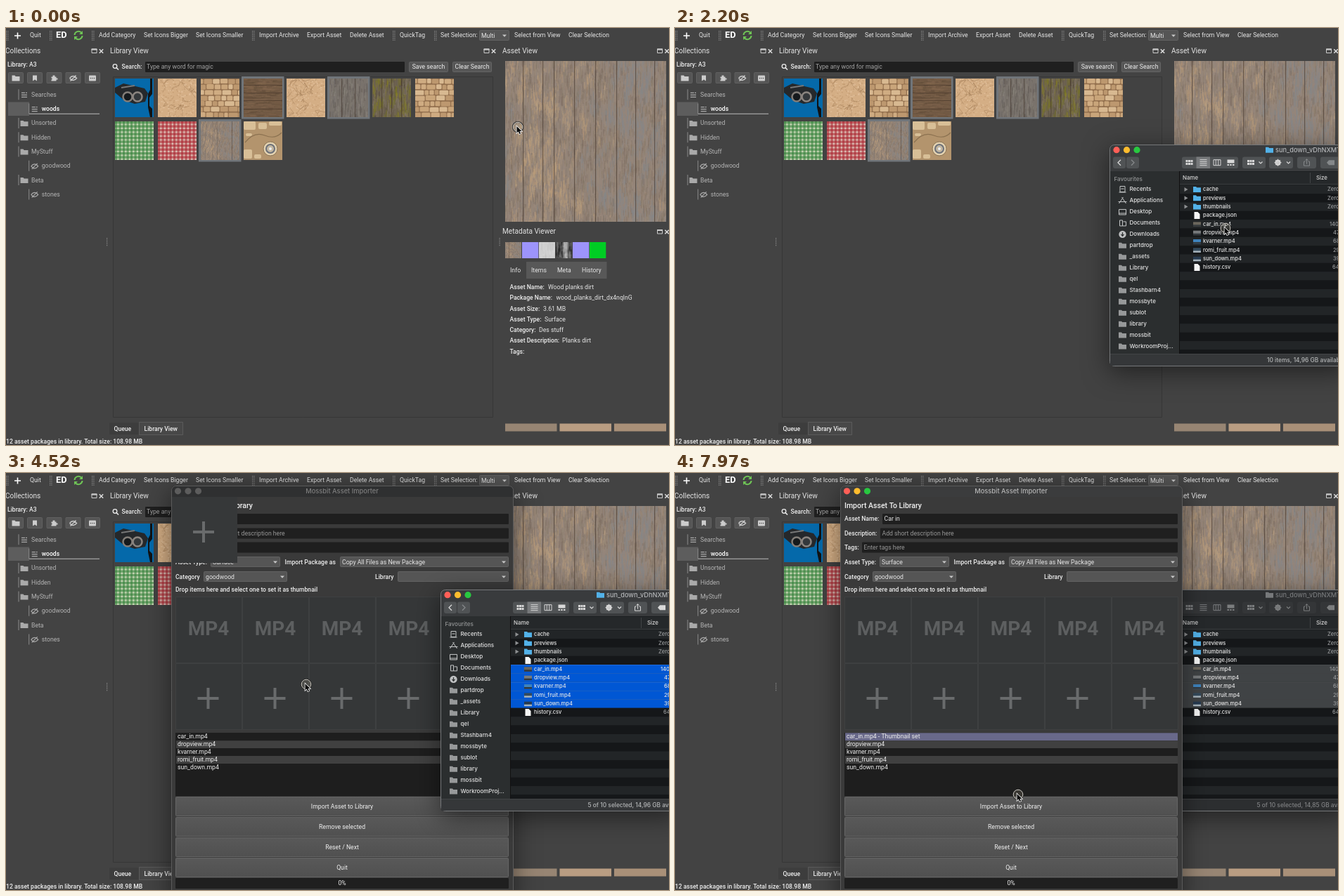
An HTML page with a canvas for the animation above (8 s loop, 943 by 594 pixels).

```html
<!DOCTYPE html>
<html lang="en">
<head>
<meta charset="utf-8">
<title>Asset library</title>
<style>
  html, body { margin: 0; height: 100%; overflow: hidden; background: #434343; }
  canvas { display: block; }
</style>
</head>
<body>
<canvas width="943" height="594"></canvas>
<script>
const LOOP = 8000, W = 943, H = 594;
let g = document.querySelector('canvas').getContext('2d');

let seed = 11;
const rnd = (a = 0, b = 1) => a + (b - a) * ((seed = seed * 16807 % 2147483647) / 2147483647);
const pick = list => list[Math.floor(rnd(0, list.length))];

const app = (size = 8.7, weight = 400) => `${weight} ${size}px Roboto, sans-serif`;
const sys = (size = 8, weight = 500) => `${weight} ${size}px Inter, sans-serif`;
const BOLD = app(8.6, 500), HEAD = app(10.1);

function rect(x, y, w, h, color, r = 0, line) {
  g.beginPath();
  g.roundRect(x, y, w, h, r);
  if (color) { g.fillStyle = color; g.fill(); }
  if (line) { g.strokeStyle = line; g.lineWidth = 1; g.stroke(); }
}
function disc(x, y, r, color, line, width = 1) {
  g.beginPath();
  g.arc(x, y, r, 0, 7);
  if (color) { g.fillStyle = color; g.fill(); }
  if (line) { g.strokeStyle = line; g.lineWidth = width; g.stroke(); }
}
function text(s, x, y, color = '#e6e6e6', font = app(), align = 'left') {
  g.font = font;
  g.fillStyle = color;
  g.textAlign = align;
  g.textBaseline = 'middle';
  g.fillText(s, x, y);
}
// Filled shape, or an outline when a line width is given
function icon(d, x, y, color, width) {
  g.save();
  g.translate(x, y);
  g.fillStyle = g.strokeStyle = color;
  g.lineWidth = width || 1;
  if (width) g.stroke(new Path2D(d)); else g.fill(new Path2D(d));
  g.restore();
}
function layer(w, h, draw) {
  const c = document.createElement('canvas'), outer = g;
  c.width = w; c.height = h;
  g = c.getContext('2d');
  draw();
  g = outer;
  return c;
}
function shadow(x, y, w, h) {
  g.save();
  g.shadowColor = 'rgba(0,0,0,.5)';
  g.shadowBlur = 36;
  g.shadowOffsetY = 8;
  rect(x, y, w, h, '#2a2a2a', 6);
  g.restore();
}

const FOLDER = 'M-5.5-4h4l1.2 1.4h5.8v6.6h-11z';
const LIST = 'M-4-3h5M-4 0h8M-4 3h8M2-3h2';
const EYE = 'M-5 0Q0-6 5 0Q0 6-5 0M-4 4L4-4';
const DOWN = 'M-3-1.5h6l-3 3.2z';
const CHEVRON = 'M-2.5-1l2.5 2.5l2.5-2.5';
const PLUS = 'M-15 0h30M0-15v30';

/* ---------- textures ---------- */
function grain(size, base, count, tone, vertical = true) {
  return layer(size, size, () => {
    rect(0, 0, size, size, base);
    g.globalAlpha = .36;
    for (let i = 0; i < count; i++) {
      const x = rnd(-8, size), y = rnd(-8, size);
      const thin = rnd(.5, 2), long = rnd(3, 16);
      rect(x, y, vertical ? thin : long, vertical ? long : thin, tone(x, y));
    }
    g.globalAlpha = 1;
  });
}
function seams(c, places, vertical) {
  const outer = g;
  g = c.getContext('2d');
  for (const p of places) {
    const [x, y, w, h] = vertical ? [p, 0, 1.2, c.height] : [0, p, c.width, 1];
    rect(x, y, w, h, 'rgba(60,46,36,.55)');
  }
  g = outer;
  return c;
}
const planks = seams(grain(229, '#94857a', 7500, (x, y) => {
  const blotch = Math.sin(x * .16 + 1.3 * Math.sin(y * .045)) * Math.sin(y * .06 + x * .11);
  const v = blotch + .75 * Math.sin(x * .028 - .2) + rnd(-.6, .6);
  return v > .75 ? pick(['#c3a581', '#b99a76']) : v < -.75 ? '#86878b' : pick(['#8f7f70', '#9d8c7a', '#7b6b5e']);
}), [25, 53, 69, 98, 128, 158, 185, 212], true);

const brownWood = seams(grain(55, '#715944', 420, () => pick(['#876b52', '#5d4937', '#7c644d']), false), [9, 20, 31, 43], false);
const greyWood = seams(grain(55, '#7a736c', 420, () => pick(['#918a83', '#5c554f', '#736d69'])), [17, 36], true);
const mossyWood = seams(grain(55, '#6d6250', 420, (x, y) =>
  Math.sin(x * .35 + 2 * Math.sin(y * .15)) + Math.sin(y * .22 + x * .1) + rnd(-.6, .6) > .1
    ? pick(['#8b8420', '#757420']) : pick(['#8d8272', '#50473a'])), [13, 27, 41], true);

const cracked = () => layer(55, 55, () => {
  rect(0, 0, 55, 55, '#d4ae85');
  for (let i = 0; i < 300; i++) rect(rnd(0, 55), rnd(0, 55), 2, 1.5, pick(['#dfbd98', '#c7a077', '#d8b48c']));
  g.strokeStyle = 'rgba(150,112,76,.5)';
  g.lineWidth = .8;
  for (let i = 0; i < 16; i++) {
    let x = rnd(0, 55), y = rnd(0, 55);
    g.beginPath();
    g.moveTo(x, y);
    for (let k = 0; k < 4; k++) g.lineTo(x += rnd(-9, 9), y += rnd(-9, 9));
    g.stroke();
  }
});
const bricks = () => layer(55, 55, () => {
  rect(0, 0, 55, 55, '#957250');
  for (let y = 0; y < 55; y += 8)
    for (let x = rnd(-8, 0), w; x < 55; x += w + 1.2) {
      w = rnd(5, 14);
      rect(x, y + rnd(0, 1), w, 6.8, pick(['#cfac82', '#d8b991', '#bd986f', '#c9a57a']), 1.5);
    }
});
const gingham = (dark, light) => layer(55, 55, () => {
  rect(0, 0, 55, 55, light);
  g.globalAlpha = .55;
  for (let p = 0; p < 55; p += 5.5) {
    rect(p, 0, 3.2, 55, dark);
    rect(0, p, 55, 3.2, dark);
  }
});
const gadget = layer(55, 55, () => {
  rect(0, 0, 55, 55, '#0569aa');
  icon('M50 0h3v22l-4 5v12l4 4v12h-3l-3-14v-19l3-6z', 0, 0, '#101214');
  icon('M0 13L12 7L42 14L47 21L43 33L28 36L13 31L0 20z', 0, 0, '#25282b');
  disc(18, 26, 6.5, '#15191c', '#827d78', 2.5);
  disc(32, 26, 6.5, '#34383b', '#8b8580', 2.5);
  icon('M9 13L28 10', 0, 0, '#777', 2);
});
const parts = layer(55, 55, () => {
  rect(0, 0, 55, 55, '#b3946d');
  for (const [x, y, w, h] of [[0, 0, 17, 12], [21, 2, 12, 9], [36, 0, 18, 6], [3, 17, 9, 4], [0, 40, 12, 13], [15, 47, 10, 6]])
    rect(x, y, w, h, '#d8bf97', 2);
  icon('M2 30Q15 14 30 20T54 16', 0, 0, '#8b7150', 1.2);
  disc(38, 39, 10, '#e4d2b0', '#8c7657');
  disc(38, 39, 6, '#c2b6a0', '#6b6f78', 2);
  disc(38, 39, 2, '#eee');
});
const tiles = [gadget, cracked(), bricks(), brownWood, cracked(), greyWood, mossyWood, bricks(),
  gingham('#2f7f36', '#c9d6b6'), gingham('#a81f2a', '#dcc0b6'), planks, parts];

/* ---------- main window ---------- */
function dockTitle(s, x, y, right) {
  text(s, x, y, '#e2e2e2', HEAD);
  rect(right - 13.5, y - 3, 7, 5.5, null, 0, '#ccc');
  rect(right - 14, y - 3.5, 8, 2, '#ccc');
  icon('M-2.7-2.7l5.4 5.4M2.7-2.7l-5.4 5.4', right, y, '#ddd', 1.5);
}
function combo(x, y, w, label) {
  rect(x + .5, y + .5, w - 1, 14, '#555', 1, '#626262');
  text(label, x + 3, y + 8);
  icon(DOWN, x + w - 7, y + 8, '#c8c8c8');
}
function grip(x, y, rows, cols) {
  for (let i = 0; i < rows; i++)
    for (let k = 0; k < cols; k++) rect(x + k * 2.3, y + i * 2.5, 1.2, 1.2, '#8a8a8a');
}

const main = layer(W, H, () => {
  rect(0, 0, W, H, '#434343');
  for (const x of [0, 62, 122, 350, 550, 609]) grip(x, 4, 6, 2);
  icon('M-4.5 0h9M0-4.5v9', 16.5, 11, '#fff', 1.6);
  text('ED', 71, 10.5, '#fff', app(12.8, 700));
  icon('M-5.5-.5A5.5 5.5 0 0 1 4-4M5.5.5A5.5 5.5 0 0 1-4 4', 103, 10.5, '#6fc456', 2);
  icon('M6-6.5v5h-5zM-6 6.5v-5h5z', 103, 10.5, '#6fc456');
  const menu = { Quit: 34, 'Add Category': 132, 'Set Icons Bigger': 196, 'Set Icons Smaller': 270, 'Import Archive': 360,
    'Export Asset': 428, 'Delete Asset': 489, QuickTag: 560, 'Set Selection:': 618, 'Select from View': 723, 'Clear Selection': 800 };
  for (const s in menu) text(s, menu[s], 10.5);
  combo(673, 3, 43, 'Multi');

  dockTitle('Collections', -1, 33, 135.5);
  dockTitle('Library View', 148, 33, 693.5);
  dockTitle('Asset View', 706, 33, 940);
  dockTitle('Metadata Viewer', 706, 290.5, 940);

  text('Library: A3', 2, 52.5, '#eee', BOLD);
  [3, 30, 57.5, 84.5, 112].forEach(x => rect(x + .5, 63.5, 21, 15, '#555', 1, '#616161'));
  icon(FOLDER, 14, 71.5, '#ccc');
  icon('M-3-4h6v8l-3-2l-3 2z', 41, 71.5, '#ccc');
  icon('M-4-2h2v-2h3v2h2v2h2v2h-2v2h-7v-2h1v-2h-1z', 68.5, 71.5, '#ccc');
  icon(EYE, 95.5, 71.5, '#ccc', 1.4);
  rect(118, 67.5, 10, 8, '#ccc', 1);
  for (let i = 0; i < 3; i++) disc(120.5 + i * 2.5, 71.5, .7, '#444');

  rect(3, 105.5, 30, 19.5, '#5d5d5d');
  rect(33, 121.8, 100, 1, '#bbb');
  const tree = [['Searches', 0, LIST], ['woods', 1, LIST], ['Unsorted', 0], ['Hidden', 0], ['MyStuff', 0],
    ['goodwood', 1, EYE], ['Beta', 0], ['stones', 1, EYE]];
  tree.forEach(([name, depth, mark], i) => {
    const y = 95.3 + i * 20.3, x = depth * 14.7, on = i === 1;
    rect(17.5 + x, y - 8, 1, 15, '#8b8b8b');
    icon(mark || FOLDER, 26 + x, y, '#aaa', mark && 1.2);
    text(name, 36 + x, y, on ? '#fff' : '#b4b4b4', on ? BOLD : app());
  });

  disc(155, 54.5, 2.8, null, '#eee', 1.3);
  icon('M2 2l3 3', 155, 54.5, '#eee', 1.6);
  text('Search:', 164.5, 55.5, '#eee', BOLD);
  rect(198, 48, 369, 15, '#1f1f1f', 1);
  text('Type any word for magic', 200, 55.5, '#a2a2a2');
  rect(573.5, 48.5, 55, 14, '#565656', 1, '#646464');
  rect(635.5, 48.5, 55, 14, '#565656', 1, '#646464');
  text('Save search', 601, 55.5, '#eee', app(), 'center');
  text('Clear Search', 663, 55.5, '#eee', app(), 'center');
  rect(152.5, 69.5, 540, 485, '#424242', 0, '#373737');
  tiles.forEach((tile, i) => {
    const x = 155 + i % 8 * 61, y = 72 + Math.floor(i / 8) * 61;
    if ([3, 5, 10].includes(i)) rect(x - 3, y - 3, 60.5, 60.5, '#70757a');
    g.drawImage(tile, x, y, 55, 55);
  });
  grip(143, 299, 5, 1);
  grip(701.5, 299, 5, 1);

  g.drawImage(planks, 710, 47);
  const grey = grain(24, '#cfcfcf', 60, () => pick(['#bbb', '#ddd']));
  const rough = grain(24, '#555', 160, x => pick(x > 10 && x < 17 ? ['#eee', '#bbb'] : ['#111', '#888']));
  [planks, '#9d94fb', grey, rough, '#9d94fb', '#00cd24'].forEach((fill, i) => {
    const x = 710 + i * 24;
    if (typeof fill === 'string') rect(x, 305, 23.3, 23, fill);
    else g.drawImage(fill, x, 305, 23.3, 23);
  });
  rect(740, 333, 114.5, 24, '#585858');
  [['Info', 717], ['Items', 747], ['Meta', 784], ['History', 819]].forEach(([s, x]) => text(s, x, 345.3));
  const info = [['Asset Name:', 'Wood planks dirt', 771], ['Package Name:', 'wood_planks_dirt_dx4nqlnG', 782.5],
    ['Asset Size:', '3.61 MB', 764], ['Asset Type:', 'Surface', 766], ['Category:', 'Des stuff', 758],
    ['Asset Description:', 'Planks dirt', 791], ['Tags:', '', 0]];
  info.forEach(([label, value, x], i) => {
    text(label, 716.5, 369.5 + i * 15.25, '#eee', BOLD);
    text(value, x, 369.5 + i * 15.25);
  });
  rect(710, 563.5, 73.5, 11, '#978573');
  rect(787.5, 563.5, 73.5, 11, '#b99d82');
  rect(865, 563.5, 74, 11, '#a99078');

  rect(147, 562.5, 42, 16.5, '#3d3d3d');
  rect(189.5, 561.5, 62, 18, '#484848', 0, '#5a5a5a');
  text('Queue', 153.5, 571.3, '#f0f0f0', BOLD);
  text('Library View', 196.5, 571.5, '#f0f0f0', BOLD);
  text('12 asset packages in library. Total size: 108.98 MB', 0, 589, '#f0f0f0', app(8.6, 500));
});

/* ---------- file browser ---------- */
const files = [['cache', 'Zero KB', 928], ['previews', 'Zero KB', 928], ['thumbnails', 'Zero KB', 928], ['package.json', '', 0],
  ['car_in.mp4', '140,2 MB', 931], ['dropview.mp4', '47,1 MB', 936], ['kvarner.mp4', '68,4 MB', 936],
  ['romi_fruit.mp4', '29,6 MB', 936], ['sun_down.mp4', '39,3 MB', 936], ['history.csv', '64 bytes', 935]];
const places = ['Recents', 'Applications', 'Desktop', 'Documents', 'Downloads', 'partdrop', '_assets', 'Library', 'qel',
  'Stashbarn4', 'mossbyte', 'sublot', 'library', 'mossbit', 'WorkroomProj...'];
const placeIcons = ['M-3.5-4.5h7v8h-7zM-5 4h10M-2-1h4', 'M-5 4L1-5M-1-5L5 4M-6 1.5h12', 'M-5-3.5h10v7.5h-10zM-5 2h10',
  'M-4-4h4v8h-4zM1-2h4v6h-5', ''];

function lights(x, y, active) {
  ['#ff5f57', '#febc2e', '#28c840'].forEach((c, i) => disc(x + i * 14.5, y, 4.6, active ? c : '#5d5d5d'));
}
function fileIcon(i, x, y) {
  if (i < 3) return icon(FOLDER, x, y, '#52b1e8');
  if (i === 3 || i === 9) return icon('M-4-5h5l3 3v7h-8z', x, y, '#f4f4f4');
  rect(x - 5.5, y - 3, 11, 6.5, ['#6b665c', '#777a7c', '#3e82bb', '#344a5c', '#263a50'][i - 4]);
  rect(x - 5.5, y + 1, 11, 2.5, i > 6 ? '#a8b4bc' : '#33383c');
}
function browser(t) {
  const active = t < 5670, selected = t < 2560 ? 0 : t < 3460 ? 1 : 5;
  const ink = active ? '#d8d8d8' : '#7b7d7e', faint = active ? '#85888a' : '#5d6062';
  shadow(618, 166, 340, 316);
  rect(618.5, 166.5, 340, 315, active ? '#393b3d' : '#2e3032', 6, '#76787a');
  lights(628, 173.7, active);
  icon(FOLDER, 845.5, 173.7, active ? '#52b1e8' : '#77797b');
  text('sun_down_vDhNXMT7', 854, 174, active ? '#b4b6b8' : '#77797b', sys(9.2));

  for (const [x, w] of [[623, 18], [642, 18], [721, 80], [807, 33], [845, 34], [885, 27], [918, 40]])
    rect(x, 183.5, w, 16.5, active ? '#505355' : '#343638', 3);
  if (active) rect(741.5, 183.5, 19.5, 16.5, '#77797b');
  icon('M2-4l-4 4l4 4', 632, 191.7, ink, 1.3);
  icon('M-2-4l4 4l-4 4', 651, 191.7, faint, 1.3);
  const GRID = 'M-5-4h3v3h-3zM-1.5-4h3v3h-3zM2-4h3v3h-3zM-5 0h3v3h-3zM-1.5 0h3v3h-3zM2 0h3v3h-3z';
  icon(GRID, 731.5, 192, ink);
  icon('M-5-4h10M-5-1.3h10M-5 1.3h10M-5 4h10', 751.5, 191.7, ink, 1);
  icon('M-5-4h10v8h-10zM-1.7-4v8M1.7-4v8', 771, 191.7, ink, 1);
  icon('M-5-4h10v5h-10zM-5 2.5h2.5v2h-2.5zM-1.3 2.5h2.5v2h-2.5zM2.5 2.5h2.5v2h-2.5z', 790.5, 191.5, ink);
  icon(GRID, 819, 192, ink);
  icon(CHEVRON, 833, 191.5, ink, 1.2);
  disc(857.5, 191.7, 3, null, ink, 2.3);
  icon('M-5 0h10M0-5v10M-3.5-3.5l7 7M3.5-3.5l-7 7', 857.5, 191.7, ink, 1);
  icon(CHEVRON, 872.5, 191.5, ink, 1.2);
  const tool = selected ? ink : faint;
  icon('M-2-1.5h-2v6h8v-6h-2M0 2v-7M-2-3l2-2l2 2', 898.5, 191.7, tool, 1);
  icon('M-5 0l3-3.5h8v7h-8z', 932, 191.7, tool);

  rect(619, 204, 98.5, 260, '#2b2e2f');
  text('Favourites', 624.5, 216, '#939596', sys(8.1));
  places.forEach((name, i) => {
    const y = 230 + i * 15.97;
    if (i > 4) icon(FOLDER, 636.5, y, '#97999a');
    else if (i === 4) {
      disc(636.5, y, 5.2, '#bfc1c2');
      icon('M0-3v5M-2 0l2 2.5l2-2.5', 636.5, y, '#2b2e2f', 1.2);
    } else icon(placeIcons[i], 636.5, y, '#c4c6c7', 1);
    text(name, 646.5, y, '#e4e4e4', sys());
  });

  rect(718, 204, 225, 260, '#1b1e20');
  for (let i = 0; i < 20; i++) {
    const y = 223.7 + i * 12.35, file = files[i], on = i >= 4 && i < 4 + selected;
    const h = Math.min(12.35, 464 - y);
    rect(718, y, 225, h, on ? (active ? '#0057d4' : '#404345') : i % 2 ? '#151719' : '#222527');
    if (on) rect(718, y, 225, .6, active ? '#2b72dc' : '#4a4d4f');
    if (!file) continue;
    const mid = y + 6.2;
    if (i < 3) icon('M-2-3l5 3l-5 3z', 726.5, mid, '#8e9092');
    fileIcon(i, 742.5, mid);
    text(file[0], 751, mid, '#e8e8e8', sys(7.5));
    text(file[1], file[2], mid, on && active ? '#e8e8e8' : '#9a9c9e', sys(7.5));
  }
  rect(718, 205, 225, 17, '#25282a');
  rect(718, 222, 225, 1, '#3b3e40');
  rect(903, 206, 1, 15, '#404345');
  text('Name', 722, 214, '#d6d6d6', sys(7.9));
  text('Size', 912, 214, '#d6d6d6', sys(7.9));
  rect(717, 204, 1, 260, '#111');

  rect(619, 464, 324, 17, active ? '#353739' : '#2c2e30');
  rect(619, 464, 324, .8, '#47494b');
  const free = `${t < 7970 ? '14,96' : '14,85'} GB available`;
  text(selected ? `${selected} of 10 selected, ${free}` : `10 items, ${free}`, selected ? 827.5 : 842, 473.7,
    active ? '#b4b6b7' : '#808284', sys(8.4));
}

/* ---------- import dialog ---------- */
function field(x, y, hint, color) {
  rect(x, y, 715 - x, 15, '#1f1f1f', 1);
  text(hint, x + 2.5, y + 7.8, color);
}
function dialog(t) {
  const active = t >= 5490, done = t >= 5670;
  shadow(235, 18, 486, 600);
  rect(235.5, 18.5, 486, 600, '#3a3a3a', 6, '#5a5a5a');
  rect(236, 19, 485, 15, active ? '#3b3c3d' : '#2f3031', [6, 6, 0, 0]);
  lights(244.5, 25.8, active);
  text('Mossbit Asset Importer', 478, 26, active ? '#b5b5b5' : '#7d7d7d', sys(9.3), 'center');

  text('Import Asset To Library', 241, 46.7, '#f0f0f0', app(10.5, 500));
  text('Asset Name:', 241, 65.8, '#eee', BOLD);
  field(295, 58, 'Car in', '#e8e8e8');
  text('Description:', 241, 86, '#eee', BOLD);
  field(292, 78.5, 'Add short description here', '#979797');
  text('Tags:', 241, 106.3, '#eee', BOLD);
  field(266, 98.5, 'Enter tags here', '#979797');
  text('Asset Type:', 241, 127, '#eee', BOLD);
  combo(291, 119, 99, 'Surface');
  text('Import Package as', 396.5, 127, '#eee', BOLD);
  combo(475, 119, 240, 'Copy All Files as New Package');
  text('Category', 241, 148, '#eee', BOLD);
  combo(281, 140, 119, 'goodwood');
  text('Library', 525, 148, '#eee', BOLD);
  combo(557, 140, 158, '');
  text('Drop items here and select one to set it as thumbnail', 241, 166.3, '#eee', BOLD);

  for (let i = 0; i < 10; i++) {
    const x = 241 + i % 5 * 95, y = i < 5 ? 176 : 271;
    rect(x + .5, y + .5, 94, 94, i === 0 && active && t < 6050 ? '#3a3a48' : '#353738', 0, '#3e4041');
    if (i < 5) text('MP4', x + 47, y + 46.5, '#5d5f60', app(28, 700), 'center');
    else icon(PLUS, x + 46.5, y + 50, '#696b6c', 4);
  }

  rect(241, 370, 474, 90.5, '#1e1e1e');
  files.slice(4, 9).forEach(([name], i) => {
    const y = 370.3 + i * 10.9;
    if (i === 0 && done) rect(242, y, 473, 10.9, '#69698a');
    else if (i % 2) rect(242, y, 473, 10.9, '#404040');
    text(name + (i === 0 && done ? ' - Thumbnail set' : ''), 244, y + 5.6, '#eee');
  });

  ['Import Asset to Library', 'Remove selected', 'Reset / Next', 'Quit'].forEach((label, i) => {
    const y = 461 + i * 29, hover = i === 0 && t >= 6430 && t < 7170;
    const shade = g.createLinearGradient(0, y, 0, y + 28);
    shade.addColorStop(0, hover ? '#626262' : '#595959');
    shade.addColorStop(1, '#505050');
    rect(241.5, y + .5, 473, 27, shade, 1, '#656565');
    text(label, 478, y + 14.2, '#f0f0f0', app(), 'center');
  });
  rect(241, 577, 474, 15, '#1f1f1f', 1);
  text('0%', 478, 584.8, '#eee', app(), 'center');

  // Before the first layout pass a stray tile covers the form
  if (t < 4720) {
    rect(236, 34, 93, 94, '#363839');
    icon(PLUS, 281, 84, '#696b6c', 4);
  }
}

/* ---------- pointer ---------- */
const AWAY = -99;
const track = [
  [0, 728, 141], [140, 752, 130], [310, 800, 106], [480, 870, 89], [650, 932, 81], [820, AWAY, AWAY],
  [1640, 925, 300], [1830, 850, 290], [2010, 800, 286], [2200, 783, 285],
  [2740, 784, 296], [2920, 786, 317], [3100, 788, 328], [3460, 788, 329],
  [3640, 762, 326], [3810, 665, 318], [3990, 545, 309], [4170, 462, 303], [4340, 427, 301],
  [4910, 405, 291], [5100, 355, 266], [5300, 306, 243], [5490, 288, 235],
  [5860, 300, 258], [6050, 348, 330], [6240, 408, 410], [6430, 450, 460], [6630, 464, 473],
  [7490, 479, 464], [7670, 488, 458]];

function pointer(t) {
  const [, x, y] = track.findLast(p => p[0] <= t);
  if (t >= 3640 && t < 4520) {
    g.globalAlpha = .55;
    for (let i = 4; i < 9; i++) {
      const row = y + (i - 7) * 12.35 + 2;
      fileIcon(i, x - 33, row);
      text(files[i][0], x - 24, row, '#eee', sys(7.5));
    }
    g.globalAlpha = 1;
  }
  const arrow = 'M-1.5-1v9.5l2.2-2l1.6 3.5l1.8-.8l-1.6-3.3h3z';
  disc(x, y, 7.2, 'rgba(255,235,200,.12)', '#222', 1.8);
  disc(x, y, 6.8, null, '#e4e0d8', .9);
  icon(arrow, x, y, '#fff', 1.5);
  icon(arrow, x, y, '#080808');
}

function frame(now) {
  const t = now % LOOP;
  g.drawImage(main, 0, 0);
  if (t >= 4520 && t < 5490) dialog(t);
  if (t >= 1450) browser(t);
  if (t >= 5490) dialog(t);
  pointer(t);
  requestAnimationFrame(frame);
}
requestAnimationFrame(frame);
</script>
</body>
</html>
```
